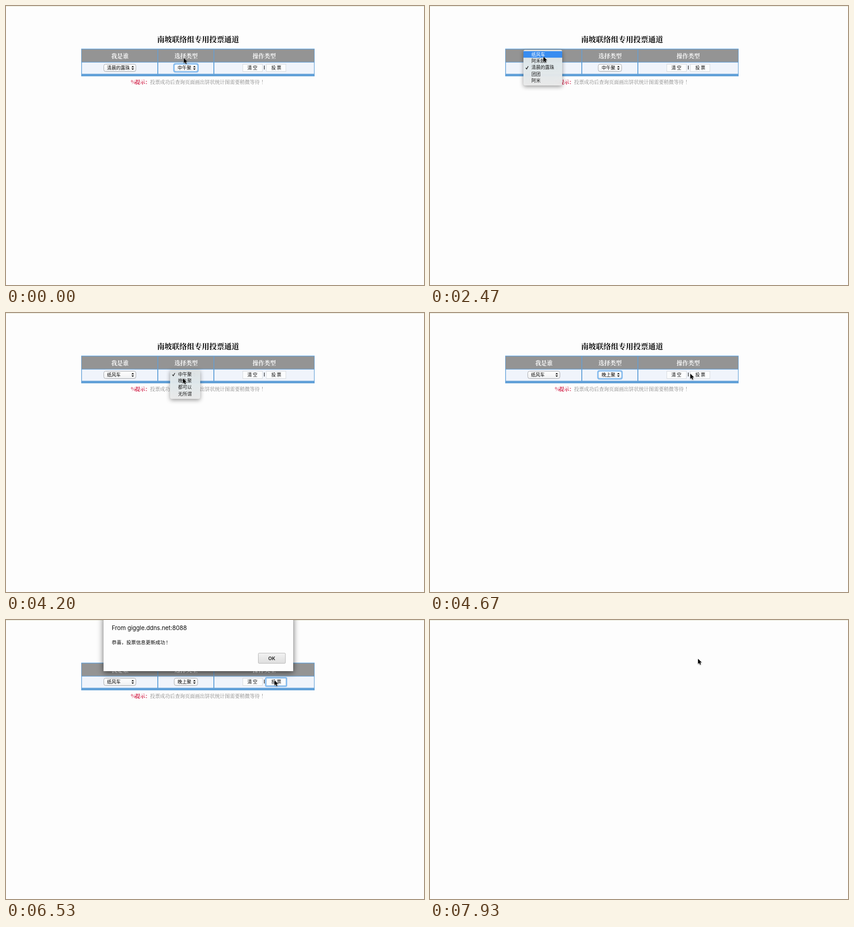
Recreate the animation shown at these times as an HTML page. Size 917 by 611 pixels, loop 8000 ms.

```html
<!DOCTYPE html>
<html lang="zh-CN">
<head>
<meta charset="utf-8">
<title>投票通道</title>
<style>
  html, body { margin: 0; width: 100%; height: 100%; overflow: hidden; background: #fdfdfd; }
  svg { display: block; width: 100vw; height: 100vh; }
  text { font: 500 10px "Noto Sans CJK SC", "Noto Sans CJK", sans-serif; fill: #080808; white-space: pre; }
  .serif text { font-family: "Noto Serif CJK SC", "Noto Sans CJK SC", "Noto Sans CJK", serif; }
  .serif .title { font-size: 16.36px; font-weight: bold; fill: #000; }
  .serif .head { font-size: 12.8px; font-weight: bold; fill: #fdfdfd; }
  .serif .hint { font-size: 10.95px; fill: #808080; }
  .serif .warn { font-weight: bold; fill: #d01840; }
  .mid { text-anchor: middle; }
  .field { fill: url(#field); stroke: #a3a5a9; }
  .button { fill: #fbfcfd; stroke: #d5d8db; }
  .ring { fill: none; stroke: #85bcf0; stroke-width: 3; }
  .menu { filter: drop-shadow(0 3px 5px #0006); }
  .menu text { fill: #1c1c1c; }
  .menu .on text { fill: #fff; }
  .menu .bar { fill: none; }
  .menu .on .bar { fill: #388cf0; }
  .tick { fill: none; stroke: #222; stroke-width: 1.4; }
  .on .tick { stroke: #fff; }
</style>
</head>
<body>
<svg viewBox="0 0 917 611">
  <defs>
    <linearGradient id="field" x2="0" y2="1">
      <stop stop-color="#fff"/><stop offset="1" stop-color="#eff0f2"/>
    </linearGradient>
    <linearGradient id="ok" x2="0" y2="1">
      <stop stop-color="#f2f2f2"/><stop offset="1" stop-color="#dedede"/>
    </linearGradient>
    <linearGradient id="sheet" x2="0" y2="1">
      <stop stop-color="#dfe3e4"/><stop offset=".45" stop-color="#e1eaed"/><stop offset="1" stop-color="#ebebeb"/>
    </linearGradient>
    <path id="arrows" d="M-2.8-1.2 0-4.6 2.8-1.2zM-2.8 1.2 0 4.6 2.8 1.2z" fill="#111"/>
  </defs>
  <rect width="917" height="611" fill="#fdfdfd"/>
  <rect width="917" height="1" fill="#e3e4d1"/>

  <g id="page">
    <g class="serif">
      <text class="title mid" x="421.5" y="79.4">南坡联络组专用投票通道</text>
      <rect x="165" y="93.5" width="512" height="60.5" fill="#61a0d8"/>
      <path d="M166 95H332.3V122.5H166zM333.8 95H455.3V122.5H333.8zM456.8 95H676V122.5H456.8z" fill="#949494"/>
      <path d="M166.5 123.8H332V148.5H166.5zM334 123.8H455V148.5H334zM457 123.8H675.8V148.5H457z" fill="#f0f4fb"/>
      <text class="head mid" x="250" y="114.2">我是谁</text>
      <text class="head mid" x="395" y="114.2">选择类型</text>
      <text class="head mid" x="566.5" y="114.2">操作类型</text>
      <text class="hint warn" x="274" y="171.3">%</text>
      <text class="hint warn" x="283.5" y="171.3">提示：</text>
      <text class="hint" x="316" y="171.3">投票成功后查询页面画出饼状统计图需要稍微等待<tspan dx="3">！</tspan></text>
    </g>
    <rect class="field" x="214.5" y="127.5" width="70.5" height="16" rx="4"/>
    <text id="who" x="221.5" y="139"></text>
    <use href="#arrows" x="278" y="135.5"/>
    <rect class="field" x="369" y="127.5" width="51.5" height="16" rx="4"/>
    <text id="kind" x="376.5" y="139"></text>
    <use href="#arrows" x="413.3" y="135.5"/>
    <rect class="button" x="519.5" y="127.5" width="43" height="16"/>
    <text class="mid" x="540.5" y="139">清 空</text>
    <rect x="566" y="130.5" width="1.2" height="8.5" fill="#111"/>
    <rect class="button" x="571" y="127.5" width="43" height="16"/>
    <text class="mid" x="593" y="139">投 票</text>
    <rect id="whoRing" class="ring" x="213.5" y="126.8" width="72.5" height="17.4" rx="4"/>
    <rect id="kindRing" class="ring" x="368.3" y="126.8" width="53" height="17.4" rx="3"/>
    <rect id="voteRing" class="ring" x="569.8" y="126.6" width="45.6" height="18.4" rx="2"/>
  </g>

  <g id="whoMenu" class="menu"></g>
  <g id="kindMenu" class="menu"></g>

  <g id="dialog">
    <rect x="214" y="-10" width="416" height="122" fill="#fdfdfd" style="filter:drop-shadow(0 3px 7px #0009)"/>
    <text x="232" y="21.5" style="font:12.9px Inter,sans-serif">From giggle.ddns.net:8088</text>
    <text x="232" y="53.2" style="font-size:10.65px">恭喜，投票信息更新成功<tspan dx="1.5">！</tspan></text>
    <rect x="553.5" y="72.5" width="59.5" height="22.5" rx="2" fill="url(#ok)" stroke="#b3b3b3"/>
    <text class="mid" x="583" y="87.8" style="font:bold 10.5px Inter,sans-serif;fill:#333">OK</text>
  </g>

  <path id="cursor" d="M0 0V11L2.6 8.7 4.4 12.8 6.3 12 4.5 8H8z" fill="#000" stroke="#fff" stroke-width=".9"
        paint-order="stroke" style="filter:drop-shadow(0 1px 1px #0006)"/>
</svg>
<script>
const LOOP = 8000, ROW = 14.2, FLASH = 65, FADE = 140;
const $ = id => document.getElementById(id);

const menus = [
  { node: $('whoMenu'), label: $('who'), x: 205, y: 96, w: 85, h: 78, from: 1400, pick: 2540,
    items: ['纸风车', '阿禾姨', '清晨的露珠', '团团', '阿米'], before: 2, after: 0 },
  { node: $('kindMenu'), label: $('kind'), x: 360, y: 124, w: 66, h: 64, from: 3450, pick: 4200,
    items: ['中午聚', '晚上聚', '都可以', '无所谓'], before: 0, after: 1 },
];

// Cursor stops: time, x, y
const stops = [
  [250, 390, 114], [1000, 268, 134], [1550, 268, 134], [2250, 249, 111], [2680, 249, 111],
  [3250, 390, 134], [3600, 390, 134], [4000, 388, 143], [4320, 388, 143], [4750, 589, 132],
  [6700, 589, 132], [7150, 588, 85],
];

for (const m of menus) {
  m.node.innerHTML = `<rect x="${m.x}" y="${m.y}" width="${m.w}" height="${m.h}" rx="4" fill="url(#sheet)" fill-opacity=".97"/>` +
    m.items.map((name, i) => `<g transform="translate(${m.x} ${m.y + 3 + i * ROW})">
      <rect class="bar" width="${m.w}" height="${ROW}"/>
      <text x="17.5" y="11">${name}</text>
      ${i === m.before ? '<path class="tick" d="M5 8 7 10.5 10.5 4.5"/>' : ''}</g>`).join('');
  m.rows = m.node.querySelectorAll('g');
}

function cursorAt(t) {
  const next = stops.findIndex(s => s[0] > t);
  if (next < 0) return stops.at(-1).slice(1);
  if (next === 0) return stops[0].slice(1);
  const a = stops[next - 1], b = stops[next];
  const k = (t - a[0]) / (b[0] - a[0]), e = k * k * (3 - 2 * k);
  return [1, 2].map(i => a[i] + (b[i] - a[i]) * e);
}

const show = (node, visible) => { node.style.display = visible ? '' : 'none'; };

function drawMenu(m, t, y) {
  const closing = m.pick + 2 * FLASH;
  const flashing = t >= m.pick && t < m.pick + FLASH;
  const hover = Math.floor((y - m.y - 3) / ROW);
  show(m.node, t >= m.from && t < closing + FADE);
  m.node.style.opacity = Math.min(1, 1 - (t - closing) / FADE);
  m.rows.forEach((row, i) => row.classList.toggle('on', i === hover && !flashing));
  m.label.textContent = m.items[t < closing ? m.before : m.after];
}

function draw(t) {
  const [x, y] = cursorAt(t);
  $('cursor').setAttribute('transform', `translate(${x} ${y})`);
  menus.forEach(m => drawMenu(m, t, y));
  show($('whoRing'), t >= 1400 && t < 2400 || t >= 2670 && t < 3450);
  show($('kindRing'), t < 1400 || t >= 4330 && t < 5130);
  show($('voteRing'), t >= 5130);
  show($('dialog'), t >= 6400 && t < 7400);
  show($('page'), t < 7600);
}

const start = performance.now();
function tick() {
  draw((performance.now() - start) % LOOP);
  requestAnimationFrame(tick);
}
tick();
</script>
</body>
</html>
```
